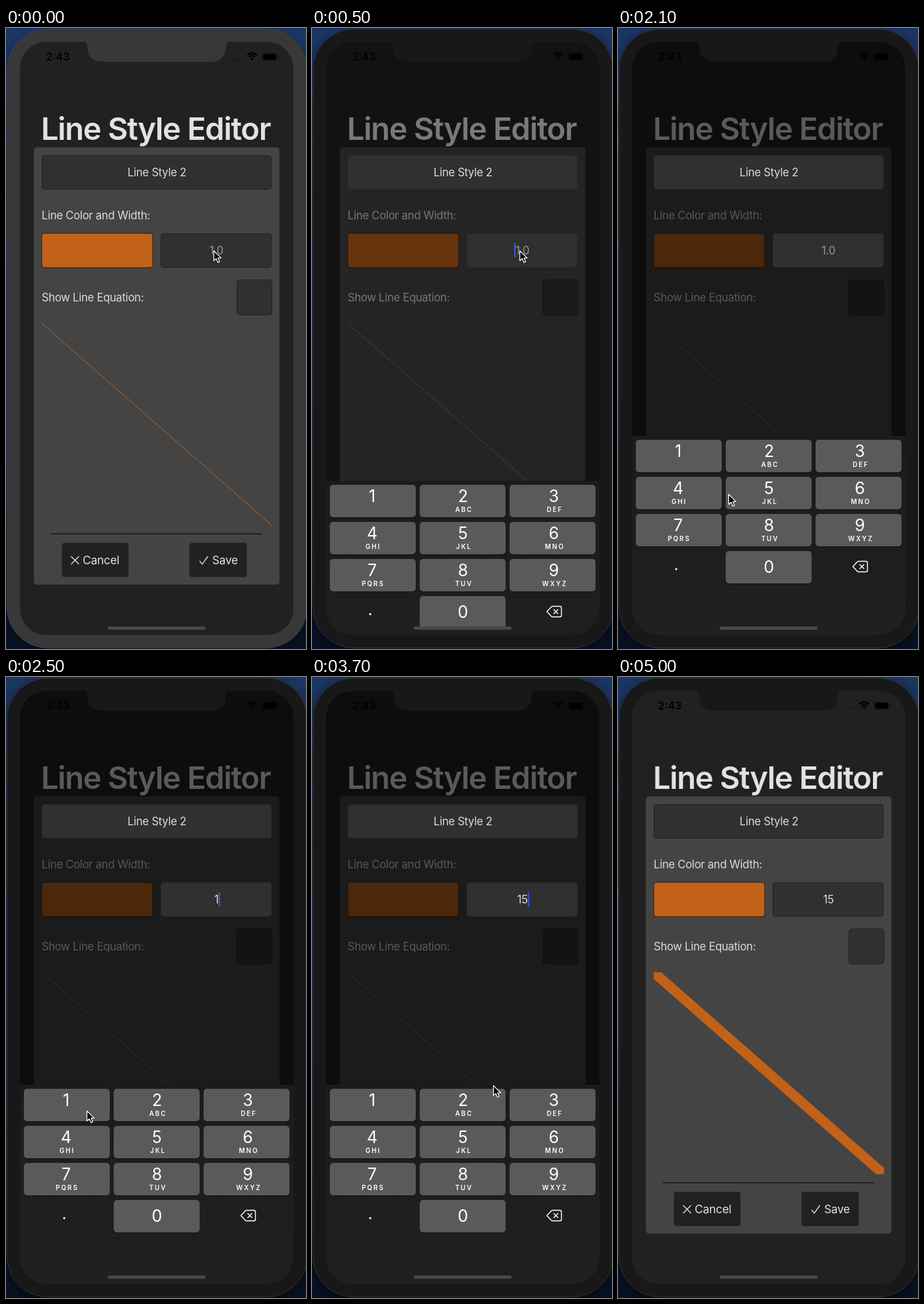
These frames come from a looping animation (454 by 938 pixels, 5.1 s). An HTML page with a canvas:

```html
<!DOCTYPE html>
<html lang="en">
<head>
<meta charset="utf-8">
<title>Line Style Editor</title>
<style>
  html, body { margin: 0; height: 100%; overflow: hidden; background: #0c1a33; }
  canvas { display: block; }
</style>
</head>
<body>
<canvas id="stage" width="454" height="938"></canvas>
<script>
const ctx = document.getElementById('stage').getContext('2d');
const LOOP = 5100, STEP = 100;
const ORANGE = '#c26118';
const KEYS = ['1', '2ABC', '3DEF', '4GHI', '5JKL', '6MNO', '7PQRS', '8TUV', '9WXYZ'];

// Pointer positions: time, x, y
const POINTER = [
  [0, 314, 336], [550, 314, 336], [800, 319, 398], [1250, 245, 745], [1500, 190, 772],
  [1800, 142, 735], [2100, 167, 704], [2350, 122, 655], [2500, 122, 655], [3000, 189, 704],
  [3500, 200, 704], [3800, 300, 586], [4000, 300, 586], [4700, 343, 691], [4900, 443, 240], [5000, 470, 225]
];

const clamp = u => Math.min(1, Math.max(0, u));
const smooth = u => (u = clamp(u), u * u * (3 - 2 * u));

// Critically damped spring from 0 to 1
function spring(ms) {
  const s = Math.max(0, ms) * 0.0172;
  return 1 - (1 + s) * Math.exp(-s);
}

function box(x, y, w, h, r, fill, stroke) {
  ctx.beginPath();
  ctx.roundRect(x, y, w, h, r);
  ctx.fillStyle = fill;
  ctx.fill();
  if (stroke) {
    ctx.strokeStyle = stroke;
    ctx.lineWidth = 1;
    ctx.stroke();
  }
}

function text(str, x, y, size, color, align = 'left', weight = 400, spacing = -0.015) {
  ctx.font = `${weight} ${size}px Inter, sans-serif`;
  ctx.letterSpacing = spacing * size + 'px';
  ctx.textAlign = align;
  ctx.fillStyle = color;
  ctx.fillText(str, x, y);
}

function stroke(d, color, width) {
  ctx.strokeStyle = color;
  ctx.lineWidth = width;
  ctx.stroke(new Path2D(d));
}

function drawDesktop() {
  const sky = ctx.createLinearGradient(0, 0, 0, 938);
  sky.addColorStop(0, '#1c3766');
  sky.addColorStop(0.6, '#152c55');
  sky.addColorStop(1, '#081226');
  ctx.fillStyle = sky;
  ctx.fillRect(0, 0, 454, 938);
}

function drawBezel(color, active) {
  ctx.save();
  ctx.shadowColor = `rgba(0,0,0,${active ? 0.6 : 0.35})`;
  ctx.shadowBlur = 26;
  ctx.shadowOffsetY = 8;
  box(1.5, 1.5, 454, 935, 62, color);
  ctx.restore();
  for (const [y, h] of [[120, 35], [183, 67], [253, 61]]) box(-4, y, 8, h, 2, '#1d1d20', '#0b0b0d');
  box(1.5, 1.5, 454, 935, 62, color, active ? '#333' : '#404040');
}

function drawPage(lineWidth) {
  ctx.fillStyle = '#212121';
  ctx.fillRect(21, 21, 414, 896);
  text('Line Style Editor', 226.5, 169, 47, '#e2e2e2', 'center', 600, -0.027);
  box(42.5, 180.5, 371, 660, 4, '#444', '#3a3a3a');
  text('Line Color and Width:', 54, 289, 16.6, '#dcdcdc');
  text('Show Line Equation:', 54, 413, 16.6, '#dcdcdc');
  box(54, 310, 168, 52, 4, ORANGE, '#1f1f1f');
  box(349.5, 380.5, 53, 53, 4, '#303030', '#222');

  ctx.save();
  ctx.beginPath();
  ctx.rect(54, 446, 348.5, 305);
  ctx.clip();
  stroke('M54 446L402 751', ORANGE, lineWidth);
  ctx.restore();

  ctx.fillStyle = '#212121';
  ctx.fillRect(68, 763, 320, 2);
  box(84.5, 777.5, 101, 52, 4, '#212121', '#383838');
  stroke('M98.5 798l12 12m0-12l-12 12', '#e0e0e0', 1.3);
  text('Cancel', 116, 810, 17.4, '#e0e0e0');
  box(277.5, 777.5, 87, 52, 4, '#212121', '#383838');
  stroke('M293 805l4 5l8.5-12', '#e0e0e0', 1.3);
  text('Save', 312, 810, 17.2, '#e0e0e0');
}

// Text fields stay above the dimming
function drawFields(t, shown) {
  const border = shown > 0.5 ? '#292929' : '#212121';
  box(54.5, 192.5, 347, 51, 4, '#303030', border);
  box(234.5, 310.5, 167, 51, 4, '#303030', border);
  text('Line Style 2', 228.5, 224, 16.6, '#dcdcdc', 'center');

  const value = t < 2500 ? '' : t < 3300 ? '1' : '15';
  text(value || '1.0', 318.5, 342, 16.6, value ? '#dcdcdc' : '#989898', 'center');

  const caretOn = t >= 400 && t < 3900 && (value || (t - 400) % 1000 < 500);
  if (caretOn) {
    const x = value ? 318.5 + ctx.measureText(value).width / 2 : 306;
    box(x, 325, 2, 22, 1, '#3f57dc');
  }
}

// Labels sit on a slightly wider grid than the keys
function drawKey(col, row, label, pressed) {
  const x = 27 + col * 136, y = 622 + row * 56, labelX = 91 + col * 137.5;
  const letters = label.slice(1);
  box(x, y + 1, 130, 49, 5, '#111');
  box(x, y, 130, 49, 5, pressed ? '#3a3a3a' : '#5a5a5a');
  text(label[0], labelX, y + (label === '0' ? 33 : 26), 25, '#fff', 'center', 400, 0);
  if (letters) text(letters, labelX + 1.5, y + 41, 9.8, '#fff', 'center', 600, 0.2);
}

function drawKeyboard(t, shown) {
  if (shown < 0.002) return;
  const pressed = t === 2400 ? '1' : t === 3200 ? '5' : '';
  ctx.save();
  ctx.translate(0, Math.round(301 * (1 - shown)));
  const back = ctx.createLinearGradient(0, 616, 0, 917);
  back.addColorStop(0, '#1b1b1b');
  back.addColorStop(1, '#202020');
  ctx.fillStyle = back;
  ctx.fillRect(21, 616, 414, 301);
  KEYS.forEach((label, i) => drawKey(i % 3, Math.floor(i / 3), label, label[0] === pressed));
  drawKey(1, 3, '0');
  text('.', 88, 819, 25, '#fff', 'center');
  ctx.lineJoin = 'round';
  stroke('M355.5 813.5L362 806.5Q363 805.5 364.5 805.5H375Q377.5 805.5 377.5 808V819Q377.5 821.5 375 821.5H364.5Q363 821.5 362 820.5ZM365.5 810l7 7m0-7l-7 7', '#fff', 1.4);
  ctx.restore();
}

function drawStatusBar() {
  text('2:43', 60.5, 49, 16, '#000', 'left', 600, 0);
  for (let i = 0; i < 4; i++) box(341 + i * 5, 46, 3, 3, 1.5, 'rgba(0,0,0,.3)');
  ctx.strokeStyle = '#000';
  ctx.lineWidth = 2.4;
  for (const r of [10, 6]) {
    ctx.beginPath();
    ctx.arc(372.5, 48, r, -Math.PI * 0.75, -Math.PI * 0.25);
    ctx.stroke();
  }
  ctx.fillStyle = '#000';
  ctx.fill(new Path2D('M372.5 49l-2.8-3.2q2.8-2.2 5.6 0z'));
  box(387.5, 37.5, 23, 12, 3.5, 'rgba(0,0,0,0)', 'rgba(0,0,0,.4)');
  box(389, 39, 20, 9, 2, '#000');
  box(412, 41.5, 1.5, 4, 1, 'rgba(0,0,0,.4)');
}

function drawPointer(t) {
  const i = POINTER.findIndex(k => k[0] > t);
  if (i < 1) return;
  const [t0, x0, y0] = POINTER[i - 1], [t1, x1, y1] = POINTER[i];
  const u = smooth((t - t0) / (t1 - t0));
  const arrow = new Path2D('M0 0V15L3.6 11.8L6.2 17.6L8.8 16.4L6.3 10.9H11Z');
  ctx.save();
  ctx.translate(x0 + (x1 - x0) * u + 0.5, y0 + (y1 - y0) * u + 0.5);
  ctx.lineJoin = 'round';
  ctx.fillStyle = '#000';
  ctx.fill(arrow);
  ctx.strokeStyle = '#fff';
  ctx.lineWidth = 1.2;
  ctx.stroke(arrow);
  ctx.restore();
}

function draw(t) {
  const shown = spring(t - 335) * (1 - spring(t - 3892.5));
  const lineWidth = 1 + 14 * smooth((t - 3780) / 350);
  const active = t >= 100;
  const bezel = active ? '#181818' : '#383838';

  drawDesktop();
  drawBezel(bezel, active);

  ctx.save();
  ctx.beginPath();
  ctx.roundRect(21, 21, 414, 896, 40);
  ctx.clip();
  drawPage(lineWidth);
  ctx.fillStyle = `rgba(0,0,0,${0.6 * shown})`;
  ctx.fillRect(21, 21, 414, 896);
  drawFields(t, shown);
  drawKeyboard(t, shown);
  drawStatusBar();
  box(154, 904, 148, 5, 2.5, '#484848');
  ctx.restore();

  ctx.fillStyle = bezel;
  ctx.fill(new Path2D('M117 20.5Q123 21 123 27Q123 51 147 51H309Q333 51 333 27Q333 21 339 20.5Z'));
  drawPointer(t);
}

function tick(now) {
  draw(Math.floor(now % LOOP / STEP) * STEP);
  requestAnimationFrame(tick);
}
requestAnimationFrame(tick);
</script>
</body>
</html>
```
